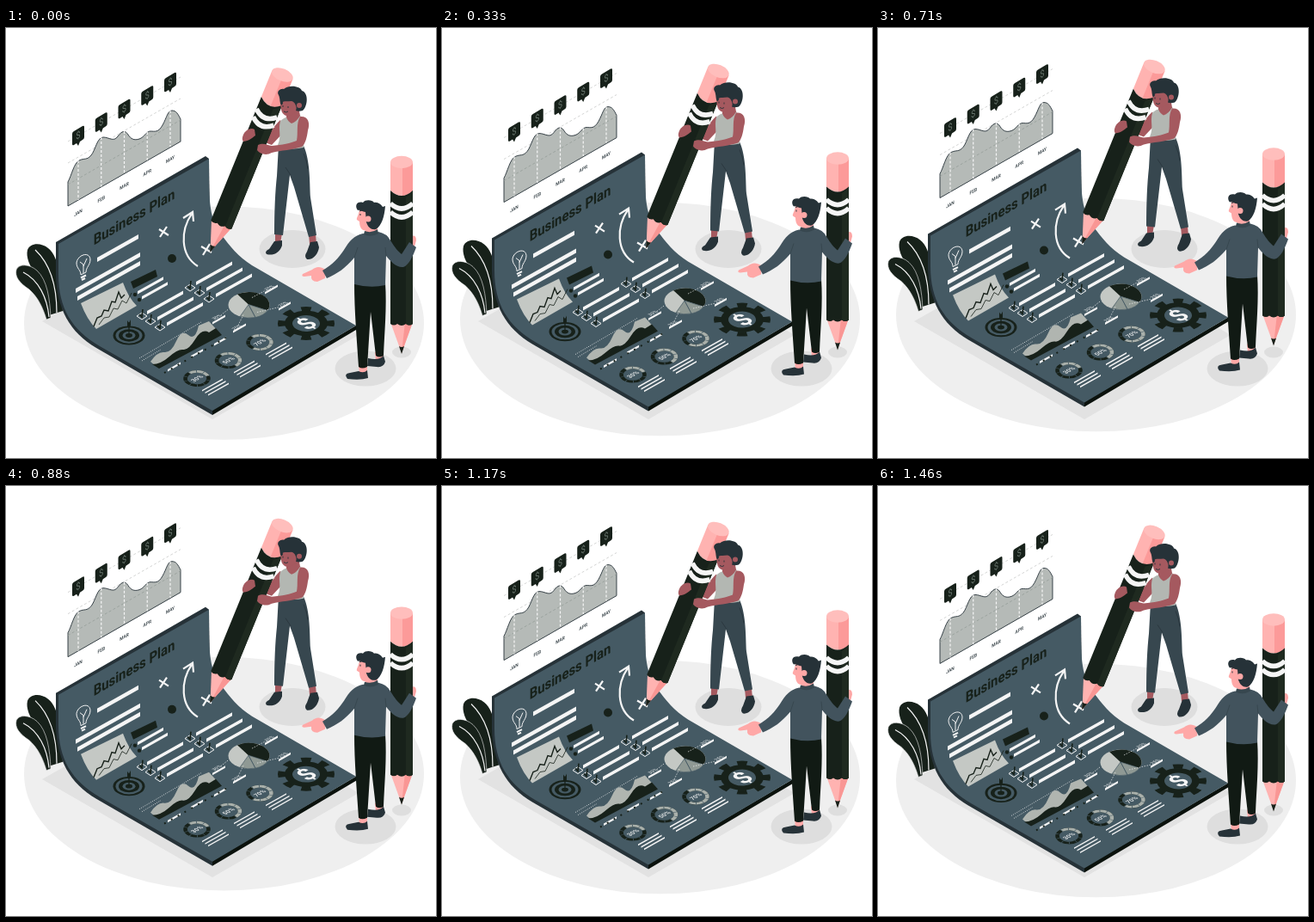
An HTML page for the animation above (1500 ms loop, 500 by 500 pixels).

```html
<!DOCTYPE html>
<html lang="en">
<head>
<meta charset="utf-8">
<title>Business Plan</title>
<style>
  html, body { margin: 0; height: 100%; overflow: hidden; background: #fff; }
  svg { display: block; width: 100%; height: 100%; }
  text { font-family: Roboto, sans-serif; text-anchor: middle; }
  .ink { fill: #17211a; }
  .slate { fill: #455a64; }
  .navy { fill: #263238; }
  .knit { fill: #42535d; }
  .skin { fill: #ffa8a7; }
  .brown { fill: #a5595f; }
  .white { fill: #f5f5f5; }
  .line { fill: none; stroke: #f5f5f5; }
  .dark { fill: none; stroke: #17211a; }
  .shade { fill: #dedede; }
</style>
</head>
<body>
<svg viewBox="0 0 500 500">
  <defs>
    <g id="pencil">
      <path fill="#ffb3b1" d="M-13-222V-189Q0-177 13-189V-222z"/>
      <path fill="#fc9a99" d="M1-216V-183Q9-184 13-189V-222z"/>
      <ellipse cy="-222" rx="13" ry="7.2" fill="#ffbebc"/>
      <path fill="#ffb3b1" d="M-13-36L0 0 13-36z"/>
      <path fill="#f99694" d="M4-36L0 0 13-36z"/>
      <path class="ink" d="M-3-8L0 1 3-8Q0-6-3-8z"/>
      <path class="ink" d="M-13-189Q0-177 13-189V-34Q9-31 5-34Q0-30-5-34Q-9-31-13-34z"/>
      <path fill="#1f2a20" d="M5-181Q10-184 13-189V-34Q9-31 5-34z"/>
      <path class="line" stroke-width="5.5" d="M-13-174Q0-162 13-174M-13-164Q0-152 13-164"/>
    </g>
  </defs>

  <g class="float">
    <ellipse cx="253.5" cy="343" rx="232.5" ry="135.8" fill="#efefef"/>
  </g>

  <path fill="#e2e2e2" d="M42 341L240 455 410 357 215 243z"/>
  <ellipse class="shade" cx="333" cy="257" rx="38.5" ry="22"/>
  <ellipse class="shade" cx="418" cy="396" rx="35.5" ry="20.5"/>
  <ellipse class="shade" cx="460" cy="377" rx="11" ry="6.5"/>

  <g class="float">
    <!-- plant -->
    <path class="ink" d="M50 334C47 318 44 302 36 288C27 277 23 266 25 258C28 250 40 249 49 256C63 267 65 300 66 329z"/>
    <path class="ink" stroke="#efefef" stroke-width=".6" d="M47 339C43 325 37 313 27 304C15 296 10 289 12 281C15 274 27 274 36 282C48 293 51 315 52 337z"/>
    <path class="line" stroke-width="1.2" d="M34 258C51 274 59 299 59 331M20 284C38 293 48 314 50 336"/>

    <!-- sheet -->
    <path class="navy" d="M58 249L232 149 236 152 240 445V450L105 372C74 354 59 326 58 287z"/>
    <path fill="#0b120d" d="M240 444L407 346V351L240 450z"/>
    <path class="slate" d="M61 251L236 152C236 194 235 220 250 240C260 253 270 266 286 276L407 346 240 445 109 370C76 351 61 325 61 287z"/>
    <g id="bars" class="white"></g>
    <text class="ink" transform="matrix(.866 -.5 0 1 149 225.5)" font-size="17.2" font-weight="700">Business Plan</text>

    <!-- bulb, arrow and crosses -->
    <path class="line" d="M87 287C87 281 82 280 82 273C83 264 97 259 98 269C98 276 93 278 93 284zM90 285V275L86 272M90 277L94 268"/>
    <path class="line" stroke-width="2" d="M87 290.500L93 287.500M88 293L92 291"/>
    <path class="line" stroke-width="2.2" d="M178 234L189 241M187 231L179 243M227 254L239 261M237 251L229 264M223 277C202 264 203 235 216 216M206 221L217 214 218 225"/>
    <circle class="ink" cx="193" cy="268" r="5"/>

    <!-- picture with zigzag -->
    <path fill="#c4c8c4" d="M87 320L136 296Q142 313 152 323L105 350Q94 339 87 320z"/>
    <path class="dark" stroke-width="1.4" d="M102 347L106 337 111 335 114 328 119 329 123 318 127 319 131 307 134 314 138 310"/>
    <path class="dark" stroke-width=".8" d="M108 345L114 337 120 336 125 326 130 327 135 317 140 320 146 308"/>
    <path class="ink" d="M145 295L174 281 176 289 148 303z"/>
    <circle class="ink" cx="150" cy="310" r="2.200"/>
    <circle class="ink" cx="155" cy="316" r="2.200"/>
    <g id="checks" stroke-width="1"></g>

    <!-- dartboard -->
    <g id="board" transform="translate(143 357.500) scale(1 .6)"></g>
    <path class="dark" stroke-width="1.2" d="M143 357V342"/>
    <path class="ink" d="M141 340L143 343 145 339 145 346 143 349 141 347z"/>

    <!-- area graph -->
    <path fill="#b0b5b0" d="M168 388Q176 376 184 377T198 364 212 357 224 346L236 341 247 353 174 393z"/>
    <path class="ink" d="M170 391Q180 391 190 382T206 374 220 362 236 354L244 349 251 357 178 396z"/>
    <path class="line" stroke-width=".8" stroke-dasharray="1 1.500" d="M155 384L227 342M158 387L180 374"/>
    <path class="dark" stroke-width="2" stroke-dasharray="2 7" d="M184 401L256 360"/>

    <!-- pie -->
    <g transform="translate(0 .5)">
      <ellipse cx="282.500" cy="321.500" rx="24" ry="15" fill="#c4c8c4"/>
      <path class="ink" d="M282 321L269 309A24 15 0 0 1 304 328z"/>
      <path fill="#8f9994" stroke="#455a64" stroke-width=".7" d="M282 321L304 328A24 15 0 0 1 290 336zM282 321L290 336A24 15 0 0 1 272 335z"/>
      <path class="line" stroke-width=".7" stroke-dasharray="1.500 1.500" d="M286 313L303 304M258 327L249 334M292 330L318 324M276 333L270 345"/>
    </g>

    <!-- gear -->
    <g transform="translate(349 343.500) scale(1 .59) rotate(-11.250)">
      <circle class="ink" r="25"/>
      <circle class="dark" r="28.500" stroke-width="9" pathLength="16" stroke-dasharray="1"/>
      <circle class="slate" r="16"/>
    </g>
    <g id="flatText" class="white"></g>
    <g id="rings"></g>

    <!-- floating chart -->
    <path fill="none" stroke="#c9cbc9" stroke-width=".8" stroke-dasharray="3 2.500" d="M72 157L203 82M72 132L203 57"/>
    <path fill="#b5bab7" d="M72 179C76 172 79 157 85 154S94 154 99 148 106 127 113 127 125 133 130 126 139 119 142 124 149 131 155 129 163 120 168 120 177 122 182 113 188 96 193 96 200 100 203 106V132L72 207z" stroke="#263238" stroke-width=".9"/>
    <path fill="none" stroke="#959d98" stroke-width=".8" stroke-dasharray="3 2.500" d="M72 182L203 107"/>
    <g id="months"></g>

    <!-- woman -->
    <path class="brown" d="M319 107C312 113 306 123 301 133L309 136 324 120z"/>
    <use href="#pencil" transform="translate(237.500 260) rotate(22.200)"/>
    <path class="brown" d="M276 124C278 119 285 115 289 118L290 125C286 128 283 131 276 132C274 129 275 127 276 124z"/>
    <path class="brown" d="M313 239H321L319 250H313zM352 240H360L361 251H353z"/>
    <path class="navy" d="M312 248L321 247 321 253C318 262 310 265 303 263Q300 260 306 257zM354 249L362 248 364 255C363 263 357 270 350 269Q346 266 350 260z"/>
    <path fill="#37474f" d="M317 136L346 137C354 154 353 182 354 197L361 241 352 243 335 185 330 171 322 241 312 240C312 212 313 190 315 172z"/>
    <path fill="none" stroke="#263238" stroke-width=".7" d="M331 171L325 162M346 146Q350 155 351 164"/>
    <path fill="#b3b7b2" d="M319 108Q324 104 326 104L333 110 342 101C347 112 347 125 346 139Q330 143 316 136C321 125 316 119 319 108z"/>
    <path class="brown" d="M326 98L340 91 342 102Q338 109 332 111 328 109 326 104z"/>
    <g transform="translate(0 2)">
      <path class="brown" d="M320 81C318 92 321 100 327 100C335 100 343 92 342 82L334 75z"/>
      <path class="navy" d="M317 76C314 71 320 68 323 69C330 63 343 66 344 71C352 73 351 89 345 94C342 95 339 95 337 94C339 90 336 84 332 83C325 84 321 82 322 86L320 88C318 85 319 80 317 76z"/>
      <circle class="brown" cx="341" cy="88" r="3"/>
      <path fill="none" stroke="#263238" stroke-width=".9" d="M322 88V90M328 89V91M323 95Q326 97 328 95"/>
    </g>
    <path class="brown" d="M342 103C351 102 354 110 351 119C350 127 348 135 344 138C333 142 320 142 309 145C302 149 295 146 292 142L293 136C299 133 304 136 309 137C321 136 331 134 338 131C340 122 337 111 342 103z"/>

    <!-- man -->
    <path class="skin" d="M471 242Q477 240 477 247L474 258 468 262z"/>
    <use href="#pencil" transform="translate(460 378)"/>
    <path class="skin" d="M410 390H420V402H411zM429 377H439V387H430z"/>
    <path class="navy" d="M410 399Q416 402 420 398L421 407Q412 410 397 408Q392 402 400 401zM421 384Q434 387 439 381L441 388Q439 395 431 394L420 393z"/>
    <path fill="#111a14" d="M405 296H441C443 325 440 355 439 381Q434 384 430 381L424 330 420 394Q414 397 410 394C408 362 405 330 405 296z"/>
    <path class="skin" d="M372 281C364 276 360 278 356 281L345 286Q343 289 347 289L355 288Q354 295 362 295L371 291z"/>
    <path class="knit" d="M415 239Q425 242 433 237Q443 239 447 247C452 255 456 260 460 263L469 249 477 255C473 266 468 276 462 278C454 279 447 271 442 265L441 299Q424 303 405 298L405 267C395 279 385 286 373 291L368 282C380 275 387 267 393 258C399 248 405 241 415 239z"/>
    <path fill="none" stroke="#37474f" d="M405 267L409 255M442 265L441 255"/>
    <path class="skin" d="M417 227H432V238Q424 243 418 238z"/>
    <path fill="#37474f" d="M417 236Q425 239 432 234L433 239Q424 244 416 240z"/>
    <path class="skin" d="M411 209C411 217 407 221 408 223L411 225C411 233 415 237 420 235C428 233 433 224 431 213z"/>
    <path class="navy" d="M409 212C405 207 408 201 415 203C418 199 426 200 428 203C434 202 437 207 438 208L441 207C440 219 437 230 430 234C425 235 421 232 419 226L418 214C414 214 412 211 409 212z"/>
    <circle class="skin" cx="421" cy="222" r="3.500"/>
    <path fill="none" stroke="#263238" d="M412 216V218M411 213L414 212"/>
  </g>
</svg>
<script>
const LOOP = 1500, STEPS = 36, RISE = 10, SLOPE = 0.56;
const fill = (id, items, draw) => {
  document.getElementById(id).innerHTML = items.map(draw).join('');
};

// x, y, width, thickness of each slanted bar
const bars = [
  [106, 267, 48, 5], [81, 303, 75, 5], [83, 312, 73, 5],
  [153, 306, 30, 3.5], [158, 312, 30, 3.5],
  [164, 329, 42, 4], [176, 336, 42, 4], [187, 342.5, 42, 4],
  [221, 295, 42, 4], [233, 302, 42, 4], [244, 309, 42, 4],
  [188, 397, 15, 2.5], [215, 381, 14, 2.5], [242, 367, 14, 2.5],
  [240, 342, 15, 2.5], [264, 352, 15, 2.5], [301, 307, 15, 2.5], [317, 326, 14, 2.5]
];
for (const [x, y] of [[228, 421], [265, 400], [302, 379]])
  for (let i = 0; i < 3; i++) bars.push([x + 3.5 * i, y + 2.5 * i, 24, 1.6]);
fill('bars', bars, ([x, y, w, h]) =>
  `<path d="M${x} ${y}l${w} ${-w * SLOPE}v${h}l${-w} ${w * SLOPE}z"/>`);

const boxes = [[158, 335], [168, 341], [179, 348], [214, 302], [225, 308], [236, 315]];
fill('checks', boxes, ([x, y]) =>
  `<path class="line" d="M${x - 6} ${y}l6 -4 6 4 -6 4z"/>
   <path class="dark" stroke-width="1.6" d="M${x - 3} ${y - 2}l3 3 1 -9"/>`);

fill('board', [18.5, 15.5, 12, 7.5, 4], (r, i) =>
  `<circle r="${r}" class="${i % 2 ? 'slate' : 'ink'}"/>`);

// text, x, y, size, weight
const labels = [
  ['$', 349, 343.5, 26, 700], ['30%', 222, 407.5, 7, 500], ['50%', 258.5, 386.5, 7, 500],
  ['70%', 295, 365.5, 7, 500], ['30%', 245, 336, 5.5, 400], ['25%', 268, 348, 5.5, 400],
  ['20%', 306, 302, 5.5, 400], ['25%', 322, 321, 5.5, 400]
];
fill('flatText', labels, ([s, x, y, size, weight]) =>
  `<text transform="matrix(.866 -.5 .866 .5 ${x} ${y})" y="${size * 0.36}"
    font-size="${size}" font-weight="${weight}">${s}</text>`);

const ring = (color, dash) =>
  `<circle r="13.500" fill="none" stroke="${color}" stroke-width="4.5" pathLength="100" stroke-dasharray="${dash}"/>`;
fill('rings', [[222, 407.5, 30], [258.5, 386.5, 50], [295, 365.5, 70]], ([x, y, part]) =>
  `<g transform="translate(${x} ${y}) scale(1 .6) rotate(-130)">
    ${ring('#17211a', '100')}${ring('#a9b0ab', part + ' 100')}${ring('#455a64', '1 9')}</g>`);

const peaks = [154, 127, 120, 121, 96];
fill('months', ['JAN', 'FEB', 'MAR', 'APR', 'MAY'], (name, i) => {
  const x = 84 + 26.75 * i, y = 125 - 15.5 * i;
  return `<path class="line" stroke-width="1.2" stroke-dasharray="3 2" d="M${x} ${peaks[i]}V${y + 75}"/>
    <path class="ink" d="M${x - 7} ${y - 2}q0-2 2-3l10-6q2-1 2 1v12q0 2-2 3l-3 2-2 5-2-3-3 2q-2 1-2-1z"/>
    <text transform="matrix(.866 -.5 0 1 ${x} ${y + 3.5})" font-size="11" fill="#66736b">$</text>
    <text class="navy" transform="matrix(.866 -.5 0 1 ${x} ${y + 91.5})" font-size="5.6" font-weight="500">${name}</text>`;
});

const floats = document.querySelectorAll('.float');
function frame(now) {
  const phase = Math.floor((now % LOOP + 4) / LOOP * STEPS) / STEPS % 1;
  const lift = RISE * (1 - Math.abs(1 - 2 * phase));
  floats.forEach(g => g.setAttribute('transform', `translate(0 ${-lift})`));
  requestAnimationFrame(frame);
}
frame(performance.now());
</script>
</body>
</html>
```
